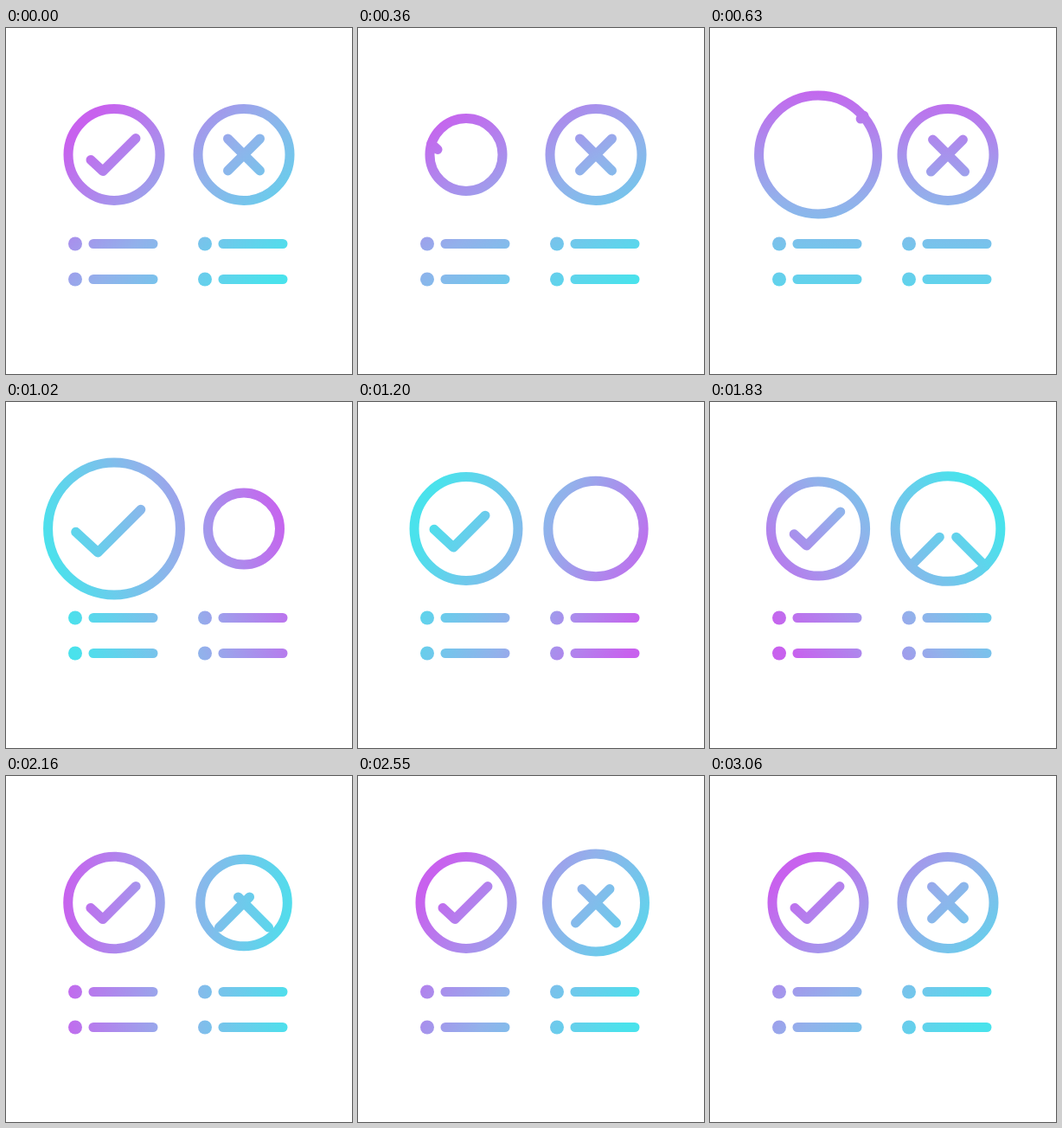
An HTML page without scripts that plays this animation: 400x400 px, repeating every 5.09 s.

```html
<!DOCTYPE html>
<html lang="en">
<head>
<meta charset="utf-8">
<title>Pros and cons</title>
<style>
  /* --s: badge scale, --p: how far the mark has slid along its path */
  @property --s { syntax: "<number>"; inherits: true; initial-value: 1; }
  @property --p { syntax: "<number>"; inherits: true; initial-value: 0; }

  html, body { margin: 0; width: 100%; height: 100%; overflow: hidden; background: #fff; }
  svg { display: block; width: 400px; height: 400px; }

  .shapes { fill: none; stroke: #fff; stroke-width: 11px; stroke-linecap: round; stroke-linejoin: round; }
  .dot { fill: #fff; stroke: none; }

  .badge {
    transform: translate(var(--x), 146.5px) scale(var(--s));
    stroke-width: calc(11px / var(--s));
  }
  .yes { --x: 125px; --from: 32.5; --len: 72.8; animation: yes-pop 5090ms linear infinite, yes-slide 5090ms linear infinite; }
  .no  { --x: 275px; --from: 26.9; --len: 52.3; animation: no-pop 5090ms linear infinite, no-slide 5090ms linear infinite; }
  .mark {
    stroke-dasharray: calc(var(--len) * 1px) 999px;
    stroke-dashoffset: calc((var(--from) + var(--p)) * -1px);
  }

  .paint {
    transform-origin: 200px 200px;
    animation: turn 5090ms cubic-bezier(.36, 0, .44, 1) infinite;
  }

  @keyframes turn {
    0% { transform: rotate(45deg); }
    60.12%, 100% { transform: rotate(405deg); }
  }

  @keyframes yes-pop {
    0% { --s: 1; animation-timing-function: ease-in-out; }
    6.48% { --s: .78; animation-timing-function: ease-in; }
    10.61% { --s: 1.13; }
    12.38% { --s: 1.29; animation-timing-function: ease-out; }
    18.27% { --s: 1.46; animation-timing-function: ease-in; }
    20.04% { --s: 1.443; }
    21.81% { --s: 1.36; animation-timing-function: ease-out; }
    27.11% { --s: .896; animation-timing-function: ease-in-out; }
    32.42% { --s: 1.06; animation-timing-function: ease-in-out; }
    35.95% { --s: 1.03; animation-timing-function: ease-out; }
    43.03% { --s: 1.005; }
    49.1%, 100% { --s: 1; }
  }
  @keyframes no-pop {
    0%, 12.57% { --s: 1; animation-timing-function: ease-in-out; }
    20.04% { --s: .783; animation-timing-function: ease-in; }
    24.07% { --s: 1.1; }
    27.11% { --s: 1.35; animation-timing-function: ease-out; }
    32.12% { --s: 1.396; animation-timing-function: ease-in; }
    35.95% { --s: 1.15; animation-timing-function: ease-out; }
    40.47% { --s: .93; animation-timing-function: ease-in-out; }
    48.13% { --s: 1.07; }
    50.1% { --s: 1.066; }
    53.63% { --s: 1.045; animation-timing-function: ease-out; }
    60.12%, 100% { --s: 1; }
  }

  /* the mark leaves at one end of its path and comes back in at the other */
  @keyframes yes-slide {
    0% { --p: 0; animation-timing-function: ease-in; }
    7.86%, 10.99% { --p: -110; }
    11% { --p: 105; }
    12.38% { --p: 91.5; }
    20.04% { --p: -5; animation-timing-function: ease-out; }
    21.81% { --p: -10; animation-timing-function: ease-in-out; }
    27.11% { --p: -.7; }
    32%, 100% { --p: 0; }
  }
  @keyframes no-slide {
    0%, 11.59% { --p: 0; }
    12.38% { --p: -1.5; animation-timing-function: ease-in; }
    19.84%, 26.1% { --p: -85; }
    26.11% { --p: 84; }
    27.11% { --p: 68.6; }
    35.95% { --p: -38; animation-timing-function: ease-out; }
    37% { --p: -40; animation-timing-function: ease-in-out; }
    43% { --p: -16; animation-timing-function: ease-out; }
    50.1% { --p: -5; animation-timing-function: ease-out; }
    60.12%, 100% { --p: 0; }
  }
</style>
</head>
<body>
<svg width="400" height="400">
  <defs>
    <linearGradient id="tint" gradientUnits="userSpaceOnUse" x1="60" y1="0" x2="340" y2="0">
      <stop offset="0" stop-color="#c861ee"/>
      <stop offset=".5" stop-color="#92b1eb"/>
      <stop offset="1" stop-color="#4ae2ec"/>
    </linearGradient>
    <g id="row">
      <circle class="dot" cx="80" r="8"/>
      <path d="M101 0H170"/>
    </g>
    <mask id="icon" maskUnits="userSpaceOnUse" x="0" y="0" width="400" height="400">
      <g class="shapes">
        <g class="badge yes">
          <circle r="53"/>
          <path class="mark" d="M-50.8 -16.1L-13 19L41 -35"/>
        </g>
        <g class="badge no">
          <circle r="53"/>
          <path class="mark" d="M-37.5 37.5L37.5 -37.5"/>
          <path class="mark" d="M37.5 37.5L-37.5 -37.5"/>
        </g>
        <use href="#row" y="249.5"/>
        <use href="#row" y="290.5"/>
        <use href="#row" x="150" y="249.5"/>
        <use href="#row" x="150" y="290.5"/>
      </g>
    </mask>
  </defs>
  <g mask="url(#icon)">
    <rect class="paint" x="-100" y="-100" width="600" height="600" fill="url(#tint)"/>
  </g>
</svg>
</body>
</html>
```
